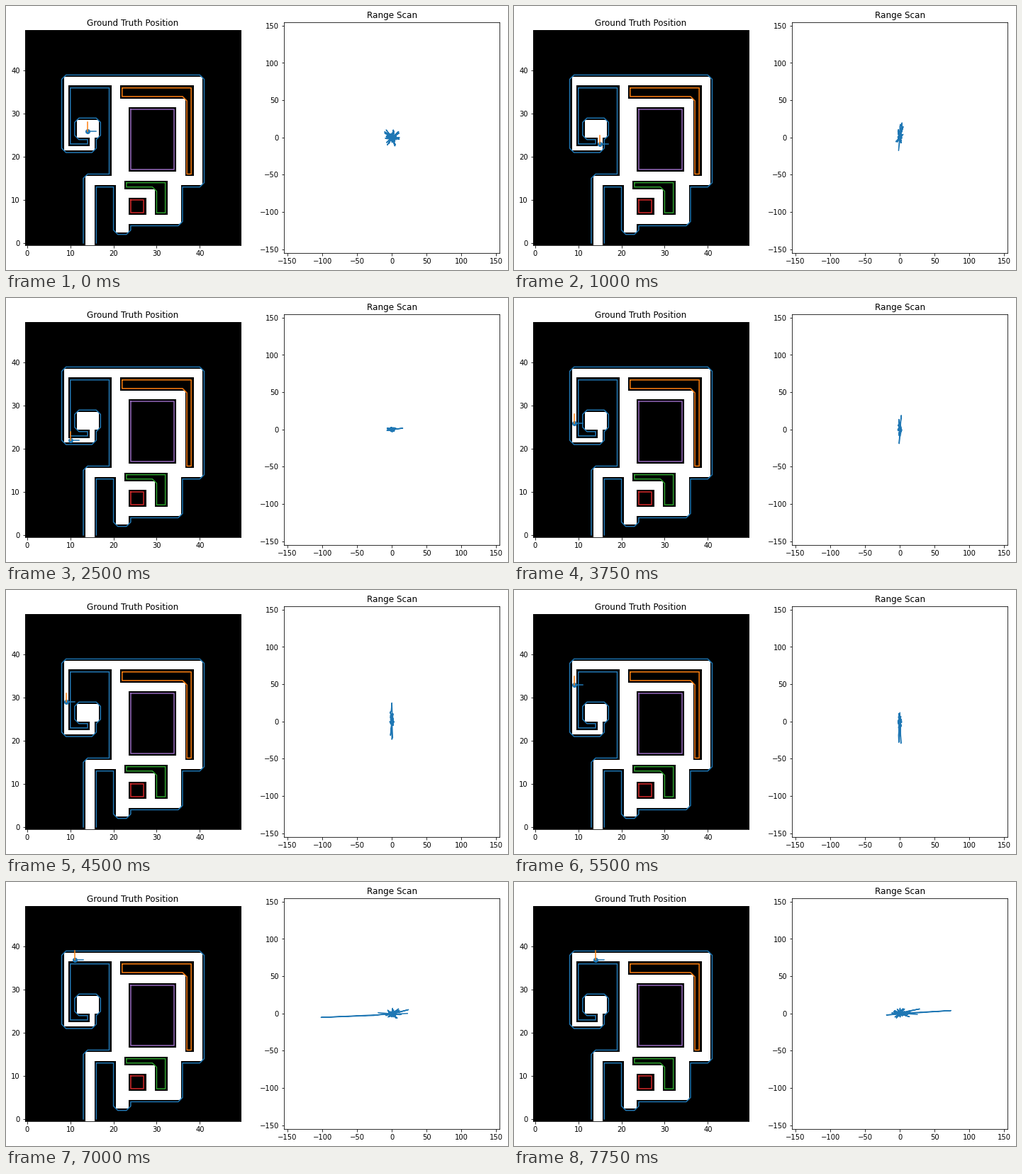
Write a matplotlib script that moves like this. It is 708 px wide and 373 px high and loops after 8000 ms.

```python
import numpy as np
import matplotlib.pyplot as plt
from matplotlib.animation import FuncAnimation

W, H, DPI = 708, 373, 72
SIZE = 50
RAYS = 120
NOISE, NOISE_MAX = 2.2, 4

plt.rcParams["font.family"] = "DejaVu Sans"

# Inclusive cell ranges: x0, x1, y0, y1
OPEN = [
    (9, 9, 22, 38), (9, 40, 37, 38), (9, 15, 22, 22), (15, 15, 22, 24),
    (12, 16, 25, 28), (20, 40, 14, 38), (14, 20, 14, 15), (14, 15, 0, 15),
    (21, 35, 5, 13), (21, 23, 3, 4),
]
BLOCKS = [
    (22, 38, 34, 36), (37, 38, 16, 36), (23, 32, 13, 14), (30, 32, 7, 14),
    (24, 27, 7, 10), (24, 34, 17, 31),
]
# A wall cell on each outline, and the side its open neighbour is on
STARTS = [(13, 0, 1), (22, 36, -1), (23, 14, -1), (24, 10, -1), (24, 31, -1)]
WAYPOINTS = [(14, 26), (14, 25), (15, 25), (15, 22), (9, 22), (9, 37), (14, 37)]

# The eight neighbours, counterclockwise from the right
AROUND = [(1, 0), (1, 1), (0, 1), (-1, 1), (-1, 0), (-1, -1), (0, -1), (1, -1)]


def build_grid():
    grid = np.zeros((SIZE, SIZE))
    for value, rects in ((1, OPEN), (0, BLOCKS)):
        for x0, x1, y0, y1 in rects:
            grid[y0:y1 + 1, x0:x1 + 1] = value
    return grid


def trace(grid, x, y, side):
    """Follow the wall cells until the outline closes or leaves the map."""
    outline = [(x, y)]
    free = (x + side, y)
    while True:
        first = AROUND.index((free[0] - x, free[1] - y))
        for k in range(1, 9):
            dx, dy = AROUND[(first + k) % 8]
            cell = (x + dx, y + dy)
            if not grid[cell[1], cell[0]]:
                break
            free = cell
        x, y = cell
        outline.append(cell)
        if cell == outline[0] or y == 0:
            return outline


def build_path():
    path = [WAYPOINTS[0]]
    for x, y in WAYPOINTS[1:]:
        while path[-1] != (x, y):
            px, py = path[-1]
            path.append((px + int(np.sign(x - px)), py + int(np.sign(y - py))))
    return path


def cast(grid, x, y, angles):
    """Distance to the first wall along each angle."""
    d = np.arange(0, SIZE, 0.25)
    cols = np.rint(x + np.outer(np.cos(angles), d)).astype(int).clip(0, SIZE - 1)
    rows = np.rint(y + np.outer(np.sin(angles), d)).astype(int).clip(0, SIZE - 1)
    return d[np.argmax(grid[rows, cols] == 0, axis=1)]


def scan(grid, step, x, y):
    """Wall distances with strong random gain, which may flip their sign."""
    rng = np.random.default_rng(100 + step)
    angles = np.linspace(0, 2 * np.pi, RAYS, endpoint=False)
    gain = rng.normal(0, NOISE, RAYS).clip(-NOISE_MAX, NOISE_MAX)
    r = cast(grid, x, y, angles) * gain
    return r * np.cos(angles), r * np.sin(angles)


grid = build_grid()
path = build_path()
scans = [scan(grid, i, x, y) for i, (x, y) in enumerate(path)]

fig = plt.figure(figsize=((W + 0.01) / DPI, (H + 0.01) / DPI), dpi=DPI,
                 facecolor="white")


def add_panel(x, y, w, h, title):
    ax = fig.add_axes([x / W, y / H, w / W, h / H])
    ax.set_title(title, fontsize=12)
    ax.tick_params(labelsize=10)
    return ax


LEFT, BOTTOM = 26.8, 24.2
SIDE, TALL = 304.36, 326.16
map_ax = add_panel(LEFT, BOTTOM + (TALL - SIDE) / 2, SIDE, SIDE,
                   "Ground Truth Position")
scan_ax = add_panel(LEFT + 1.2 * SIDE, BOTTOM, SIDE, TALL, "Range Scan")

map_ax.imshow(grid, cmap="gray", origin="lower", interpolation="nearest",
              aspect="auto")
for i, start in enumerate(STARTS):
    map_ax.plot(*zip(*trace(grid, *start)), color=f"C{i}", lw=1.5)
map_ax.set(xlim=(-0.5, 49.5), ylim=(-0.5, 49.5),
           xticks=range(0, 50, 10), yticks=range(0, 50, 10))
scan_ax.set(xlim=(-155, 155), ylim=(-155, 155),
            xticks=range(-150, 151, 50), yticks=range(-150, 151, 50))

dot = map_ax.scatter([0], [0], color="C0")
x_arm, = map_ax.plot([], [], color="C0", lw=1.5)
y_arm, = map_ax.plot([], [], color="C1", lw=1.5)
beams, = scan_ax.plot([], [], color="C0", lw=1.5)


def update(step):
    x, y = path[step]
    dot.set_offsets([(x, y)])
    x_arm.set_data([x, x + 2], [y, y])
    y_arm.set_data([x, x], [y, y + 2])
    beams.set_data(*scans[step])
    return dot, x_arm, y_arm, beams


anim = FuncAnimation(fig, update, frames=len(path), interval=250, repeat=True,
                     repeat_delay=0, blit=False)
plt.show()
```
